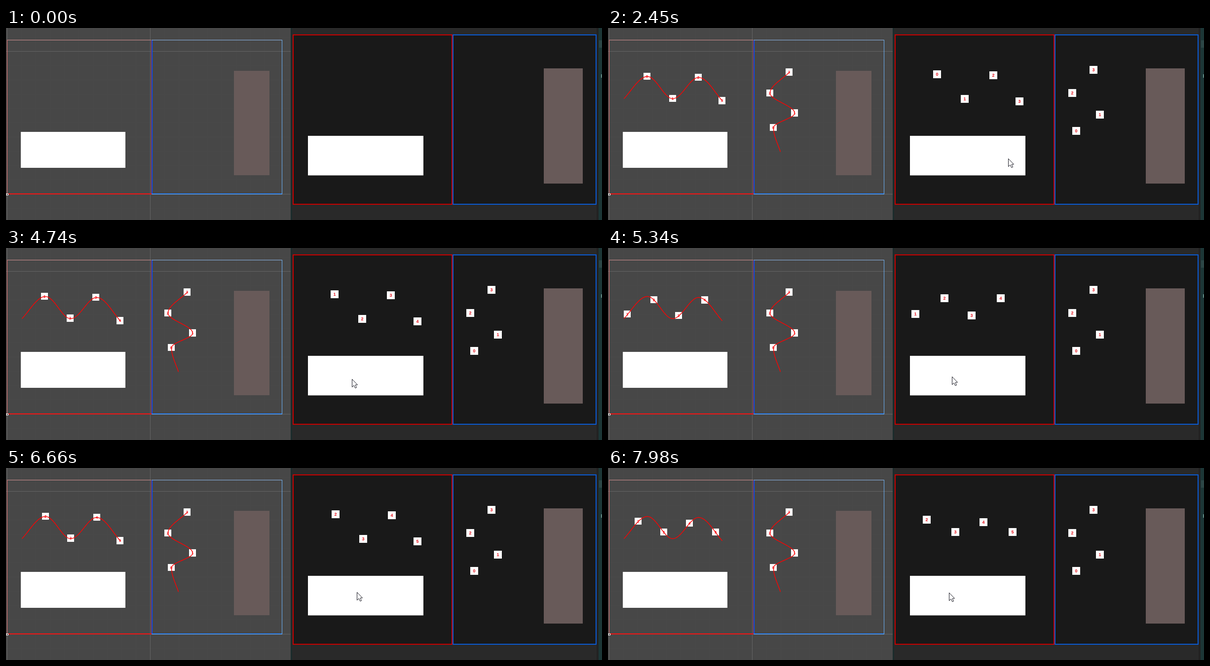
Recreate the animation shown at these times as an HTML page with a canvas. Size 1208 by 390 pixels, loop 8 s.

```html
<!DOCTYPE html>
<html lang="en">
<head>
<meta charset="utf-8">
<title>Curved scroll lists</title>
<style>
html, body { margin: 0; width: 100%; height: 100%; overflow: hidden; background: #292929; }
canvas { display: block; }
</style>
</head>
<body>
<canvas id="stage" width="1208" height="390"></canvas>
<script>
const ctx = document.getElementById('stage').getContext('2d');
const LOOP = 8000, STEP = 120, PLAY = 1490, DRAG = 3060;
const SLOT = 82.5;   // pointer travel per list slot
const SETTLE = 440;  // decay time of the snap

// Turning points of the two list paths
const WAVE = [[32, 143], [79.3, 98], [130.5, 143], [183, 100], [231.2, 147.5]];
const SNAKE = [[349, 251], [335, 202], [378, 172.5], [328, 132], [367, 89.5]];

// Key points of the pointer: time, x, y
const POINTER = [[500, 793, 95], [620, 800, 104], [PLAY, 800, 108], [2210, 806, 279], [2450, 811, 265],
  [2940, 808, 265], [3780, 706, 269], [4620, 702, 266], [4740, 701, 266], [5220, 642, 262],
  [5700, 861, 258], [5940, 747, 257], [6660, 711, 252], [7200, 787, 255], [7980, 691, 253]];

// Each drag starts on a whole slot and settles on the next
const DRAGS = [{ press: 2940, release: 3780 }, { press: 4620, release: 5220 }, { press: 6710, release: LOOP }];

const mix = (a, b, u) => a + (b - a) * u;

function pointerAt(t) {
  let i = 1;
  while (i < POINTER.length - 1 && POINTER[i][0] < t) i++;
  const a = POINTER[i - 1], b = POINTER[i];
  const u = Math.min(1, (t - a[0]) / (b[0] - a[0]));
  return [mix(a[1], b[1], u), mix(a[2], b[2], u)];
}

function scrollAt(t) {
  let offset = 0;
  DRAGS.forEach(({ press, release }, slot) => {
    if (t < press) return;
    const pulled = slot + (pointerAt(press)[0] - pointerAt(Math.min(t, release))[0]) / SLOT;
    offset = t <= release ? pulled : mix(slot + 1, pulled, Math.exp((release - t) / SETTLE));
  });
  return offset;
}

// Joins the points with S-bends that run along one axis at each turn
function makePath(points, axis) {
  const pts = [[...points[0], 0]], marks = [0];
  for (let i = 1; i < points.length; i++) {
    const a = points[i - 1], b = points[i], cross = 1 - axis;
    const c = [...a], d = [...b];
    c[axis] = mix(a[axis], b[axis], 0.36);
    d[axis] = mix(b[axis], a[axis], 0.34);
    if (i === 1) c[cross] = mix(a[cross], b[cross], 0.42);
    if (i === points.length - 1) d[cross] = mix(b[cross], a[cross], 0.38);
    for (let n = 1; n <= 60; n++) {
      const u = n / 60, v = 1 - u;
      const at = k => v * v * v * a[k] + 3 * v * v * u * c[k] + 3 * v * u * u * d[k] + u * u * u * b[k];
      const x = at(0), y = at(1), last = pts[pts.length - 1];
      pts.push([x, y, last[2] + Math.hypot(x - last[0], y - last[1])]);
    }
    marks.push(pts[pts.length - 1][2]);
  }
  return { pts, first: marks[1], total: marks[marks.length - 1] };
}

const wave = makePath(WAVE, 0), snake = makePath(SNAKE, 1);
const gap = (wave.total - wave.first) / 3;

const pointAt = (path, s) => path.pts.find(p => p[2] >= s) || path.pts[path.pts.length - 1];

function rect(color, x, y, w, h) {
  ctx.fillStyle = color;
  ctx.fillRect(x, y, w, h);
}

function frame(color, x, y, w, h) {
  ctx.strokeStyle = color;
  ctx.lineWidth = 2;
  ctx.strokeRect(x, y, w, h);
}

function drawScene() {
  rect('#474747', 0, 0, 577, 390);
  for (let x = 2; x < 577; x += 29) rect('#494949', x, 0, 1, 390);
  for (let y = 18; y < 390; y += 29) rect('#494949', 0, y, 577, 1);
  for (const x of [2, 292]) rect('#646464', x, 0, 1, 390);
  for (const y of [47, 337]) rect('#646464', 0, y, 577, 1);
  rect('#d09090', 2, 24, 292, 1);
  rect('#8cb4e4', 295, 24, 265, 1);
  rect('#e07070', 2, 24, 1, 314);
  rect('#b42828', 294, 25, 1, 312);
  rect('#0a50e6', 295, 25, 2, 312);
  rect('#f51414', 2, 336, 293, 2);
  rect('#0a6cf5', 295, 336, 265, 1);
  rect('#6cb0f5', 295, 337, 265, 1);
  rect('#6cb0f5', 559, 24, 1, 314);
  rect('#ffffff', 0, 336, 5, 4);
  rect('#474747', 1, 337, 3, 2);
  rect('#ffffff', 30, 211, 212, 73);
  rect('#685a59', 462, 87, 72, 212);
}

function drawGame() {
  rect('#292929', 577, 0, 631, 390);
  rect('#1b2c2c', 577, 0, 3, 390);
  rect('#222222', 1197, 0, 4, 390);
  rect('#1c3636', 1201, 0, 7, 390);
  rect('#2c4646', 1202, 25, 6, 15);
  rect('#5f8783', 1206, 94, 2, 7);
  rect('#191919', 582, 14, 614, 344);
  frame('#c80000', 582, 14, 322, 344);
  frame('#0a5ad2', 906, 14, 290, 344);
  rect('#ffffff', 612, 219, 234, 80.4);
  rect('#685a59', 1090, 82, 79, 234);
}

function label(text, x, y, size) {
  ctx.font = `bold ${size}px Arial, "Liberation Sans", sans-serif`;
  ctx.textAlign = 'center';
  ctx.fillStyle = '#e6141e';
  ctx.fillText(text, x, y + size * 0.36);
}

// Each item shows in the small view and, scaled up, in the large one
function drawItem(n, [x, y]) {
  const left = Math.round(x - 7), top = Math.floor(y - 7);
  rect('#ffffff', left, top, 14, Math.round(y + 7) - top);
  label(n, left + 7, top + 7, 8);
  const gx = Math.round(666.8 + (x - 79.3) * 1.104), gy = Math.round(94 + (y - 98) * 1.105);
  rect('#ffffff', gx - 8, gy - 8, 16, 16);
  label(n, gx, gy, 9);
}

function drawCurve({ pts }) {
  ctx.beginPath();
  for (const [x, y] of pts) ctx.lineTo(x + 0.5, y + 0.5);
  ctx.strokeStyle = '#ff0000';
  ctx.lineWidth = 1.4;
  ctx.stroke();
}

function drawLists(offset) {
  for (let n = 0; n < 6; n++) {
    const s = wave.first + (n - offset) * gap;
    if (s > -1.8 && s < wave.total + 1.2) drawItem(n, pointAt(wave, s));
  }
  SNAKE.slice(1).forEach((point, n) => drawItem(n, point));
  drawCurve(wave);
  drawCurve(snake);
}

function drawPointer([x, y]) {
  const shape = [[0, 0], [0, 16], [3.7, 12.6], [6.3, 18], [9, 17], [6.5, 11.6], [11, 11.4]];
  ctx.beginPath();
  for (const [dx, dy] of shape) ctx.lineTo(Math.round(x) + 0.5 + dx, Math.round(y) + 0.5 + dy);
  ctx.closePath();
  ctx.fillStyle = '#ffffff';
  ctx.fill();
  ctx.strokeStyle = '#1c1c26';
  ctx.lineWidth = 1;
  ctx.stroke();
}

// The picture moves in steps, with pauses before play and before dragging
function stepped(t) {
  if (t < 500) return 0;
  if (t < PLAY) return t < 620 ? 500 : 620;
  const base = t < DRAG ? PLAY : DRAG;
  const held = base + Math.floor((t - base) / STEP) * STEP;
  return t < DRAG ? Math.min(held, 2810) : held;
}

let start;
function tick(now) {
  start ??= now;
  const t = stepped(Math.max(0, now - start) % LOOP);
  drawScene();
  drawGame();
  if (t >= PLAY) drawLists(scrollAt(t));
  if (t >= 500) drawPointer(pointerAt(t));
  requestAnimationFrame(tick);
}
requestAnimationFrame(tick);
</script>
</body>
</html>
```
